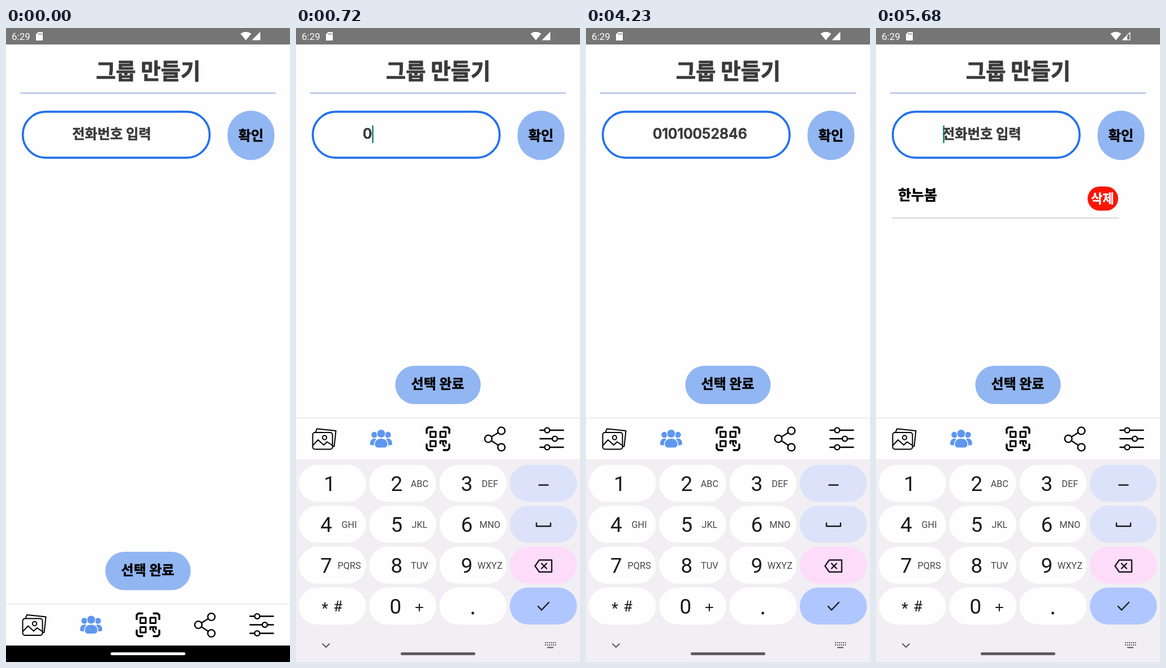
Recreate the animation shown at these times as an HTML page with a canvas. Size 502 px wide and 1116 px high, loop 5.75 s.

```html
<!DOCTYPE html>
<html lang="ko">
<head>
<meta charset="utf-8">
<style>
html, body { margin: 0; width: 502px; height: 1116px; overflow: hidden; background: #fefefe; }
canvas { display: block; }
</style>
</head>
<body>
<canvas id="stage" width="502" height="1116"></canvas>
<script>
const ctx = document.getElementById('stage').getContext('2d');
const LOOP = 5750;
const KOREAN = '"Noto Sans CJK KR", "Noto Sans CJK JP", "Noto Sans CJK", sans-serif';
const LATIN = 'Roboto, sans-serif';
const DIGITS = '01010052846';
const KEY_TIMES = [720, 920, 1250, 1450, 1650, 1850, 2250, 2650, 3050, 3310, 3770];
const PRESS = 4490, CLEAR = 4560, ADDED = 4840;
const SHIFT = 327.5;
const INK = '#1b1b1f';

function box(x, y, w, h, r, fill) {
  ctx.beginPath();
  ctx.roundRect(x, y, w, h, r);
  if (fill) { ctx.fillStyle = fill; ctx.fill(); }
}

function line(points, color, width, close) {
  ctx.beginPath();
  points.forEach(([x, y]) => ctx.lineTo(x, y));
  if (close) ctx.closePath();
  ctx.strokeStyle = color;
  ctx.lineWidth = width;
  ctx.stroke();
}

function disc(x, y, r, fill, stroke, width) {
  ctx.beginPath();
  ctx.arc(x, y, r, 0, Math.PI * 2);
  if (fill) { ctx.fillStyle = fill; ctx.fill(); }
  if (stroke) { ctx.strokeStyle = stroke; ctx.lineWidth = width; ctx.stroke(); }
}

function text(str, x, y, font, color, align = 'center', outline = 0) {
  ctx.font = font;
  ctx.fillStyle = color;
  ctx.textAlign = align;
  ctx.fillText(str, x, y);
  if (!outline) return;
  ctx.strokeStyle = color;
  ctx.lineWidth = outline;
  ctx.strokeText(str, x, y);
}

// Heavy, round-cornered Korean lettering centred vertically on cy.
function label(str, x, cy, size, color, align = 'center') {
  text(str, x, cy + size * 0.37, `bold ${size}px ${KOREAN}`, color, align, size / 45);
}

function statusBar(weakSignal) {
  ctx.fillStyle = '#757575';
  ctx.fillRect(0, 0, 502, 29);
  text('6:29', 10, 21, `17px ${LATIN}`, '#fff', 'left');
  ctx.beginPath();
  ctx.moveTo(57, 7); ctx.lineTo(64, 7); ctx.lineTo(65, 8); ctx.lineTo(65, 22);
  ctx.lineTo(53, 22); ctx.lineTo(53, 11); ctx.closePath();
  ctx.fillStyle = '#fff';
  ctx.fill();
  ctx.fillStyle = '#757575';
  [57, 59.5, 62].forEach(x => ctx.fillRect(x, 9, 1.2, 3));

  ctx.fillStyle = '#fff';
  ctx.beginPath();
  ctx.moveTo(424, 21.5);
  ctx.lineTo(414.5, 10);
  ctx.quadraticCurveTo(424, 3.5, 433.5, 10);
  ctx.fill();
  ctx.beginPath();
  ctx.moveTo(434.5, 21.5); ctx.lineTo(449.5, 21.5); ctx.lineTo(449.5, 6.5);
  ctx.fill();
  if (weakSignal) {
    ctx.fillStyle = '#757575';
    ctx.beginPath();
    ctx.moveTo(444, 14); ctx.lineTo(448.3, 9.6); ctx.lineTo(448.3, 20.3); ctx.lineTo(444, 20.3);
    ctx.fill();
  }
}

function photosIcon() {
  line([[35, 1038], [37, 1033], [70.5, 1036.5], [67.5, 1064], [65, 1064]], '#000', 2);
  box(29.5, 1039.5, 35, 29.5, 4, '#fefefe');
  ctx.strokeStyle = '#000';
  ctx.lineWidth = 2;
  ctx.stroke();
  line([[30, 1062], [39, 1052.5], [49, 1061.5], [55, 1056], [64, 1062]], '#000', 2);
  disc(50.5, 1048.5, 3.7, null, '#000', 2);
}

function groupIcon() {
  const blue = '#5f97ef';
  for (const side of [-1, 1]) {
    disc(150.5 + side * 12, 1043.5, 5.3, blue);
    ctx.save();
    ctx.translate(150.5, 0);
    ctx.scale(side, 1);
    box(9, 1050, 10.5, 12, [2, 8, 3, 2], blue);
    ctx.restore();
  }
  box(138, 1049, 25, 18, [11, 11, 6, 6], '#fefefe');
  box(139.5, 1050.5, 22, 15.5, [9, 9, 5, 5], blue);
  disc(150.5, 1041.5, 8.2, '#fefefe');
  disc(150.5, 1041.5, 7, blue);
}

function scanIcon() {
  ctx.save();
  ctx.translate(251, 1050.5);
  for (let i = 0; i < 4; i++) {
    line([[-20, -10], [-20, -17], [-17, -20], [-10, -20]], '#000', 3.4);
    ctx.rotate(Math.PI / 2);
  }
  ctx.strokeStyle = '#000';
  ctx.lineWidth = 3;
  [[-13.5, -12.5], [4, -12.5], [-13.5, 4]].forEach(([x, y]) => ctx.strokeRect(x, y, 9.5, 9.5));
  line([[4, 8], [4, 4], [14, 4], [14, 8]], '#000', 3);
  line([[9, 4], [9, 10], [12, 13]], '#000', 3);
  ctx.restore();
}

function shareIcon() {
  line([[363, 1036.5], [340, 1050.5], [363, 1065.5]], '#000', 2.4);
  [[340, 1050.5], [363, 1036.5], [363, 1065.5]].forEach(([x, y]) => disc(x, y, 6.4, '#fefefe', '#000', 2.4));
}

function slidersIcon() {
  [444, 457.5, 444].forEach((x, i) => {
    const y = 1035.5 + i * 15;
    line([[431.5, y], [472.5, y]], '#000', 2.6);
    disc(x, y, 4.4, '#fefefe', '#000', 2.4);
  });
}

function bottomPanel() {
  box(175.5, 922, 151, 67.5, 33.75, '#92b6f2');
  label('선택 완료', 250.5, 954, 24, '#000');
  ctx.fillStyle = '#dedede';
  ctx.fillRect(0, 1013.5, 502, 1);
  photosIcon();
  groupIcon();
  scanIcon();
  shareIcon();
  slidersIcon();
}

function keyboard(offset) {
  ctx.save();
  ctx.translate(0, offset);
  ctx.fillStyle = '#f1eff3';
  ctx.fillRect(0, 759, 502, 357);

  const sideColors = ['#dce2f9', '#dce2f9', '#fddcfa', '#b0c6ff'];
  const letters = ['', 'ABC', 'DEF', 'GHI', 'JKL', 'MNO', 'PQRS', 'TUV', 'WXYZ'];
  const big = `37px ${LATIN}`;
  for (let row = 0; row < 4; row++) {
    const y = 769 + row * 72;
    for (let col = 0; col < 4; col++) {
      box(5 + col * 124.3, y, 118.7, 65, 32.5, col < 3 ? '#fefefe' : sideColors[row]);
      if (row > 2 || col > 2) continue;
      const i = row * 3 + col;
      const x = i === 0 ? 59.5 : [53.5, 178, 302][col];
      text(String(i + 1), x, y + 46, big, INK);
      text(letters[i], 94 + col * 124.4, y + 38.5, `16.3px ${LATIN}`, '#46464c');
    }
  }
  text('*', 51, 1031, `27px ${LATIN}`, INK);
  text('#', 74, 1027, `26px ${LATIN}`, INK);
  text('0', 176, 1031, big, INK);
  line([[212, 1020], [224, 1020]], INK, 2);
  line([[218, 1014], [218, 1026]], INK, 2);
  disc(312.5, 1030, 2.4, INK);

  line([[429.5, 804.5], [445.5, 804.5]], INK, 2.4);
  line([[425, 871.5], [425, 877], [450, 877], [450, 871.5]], INK, 2.4);
  line([[422.5, 947], [430, 936.5], [452, 936.5], [452, 957.5], [430, 957.5]], INK, 2.4, true);
  line([[434, 942.5], [443, 951.5]], INK, 2.4);
  line([[443, 942.5], [434, 951.5]], INK, 2.4);
  line([[428, 1018], [434, 1024.5], [447, 1011]], INK, 2.4);

  line([[47, 1084], [53, 1090], [59, 1084]], '#55555a', 1.8);
  ctx.fillStyle = '#55555a';
  for (let row = 0; row < 2; row++)
    for (let col = 0; col < 6; col++) ctx.fillRect(440 + col * 3.5, 1081 + row * 4, 2, 2);
  ctx.fillRect(444, 1089.5, 11, 2);
  ctx.restore();
  box(185, 1099, 132, 5, 2.5, offset ? '#fff' : '#5e5c62');
}

function input(t) {
  box(29.6, 147.4, 330.4, 81, 40.5);
  ctx.strokeStyle = '#2271ec';
  ctx.lineWidth = 3.7;
  ctx.stroke();

  const typed = t < CLEAR ? KEY_TIMES.filter(k => k <= t).length : 0;
  const x = t >= CLEAR && t < CLEAR + 70 ? 111 : 118;
  let caret = x + 0.5, on;
  if (typed) {
    const value = DIGITS.slice(0, typed);
    text(value, x, 195, '600 25px Inter, sans-serif', '#3a3a3a', 'left', 0.7);
    caret = x + ctx.measureText(value).width;
    const last = KEY_TIMES[typed - 1];
    on = t - last < (last >= 3050 ? 260 : 200);
  } else {
    label('전화번호 입력', x - 1, 186, 24.3, '#3a3a3a', 'left');
    on = t >= CLEAR ? Math.floor((t - CLEAR) / 250) % 2 === 0 : t >= 260 && t < 520;
  }
  if (on) {
    ctx.fillStyle = '#0b7a70';
    ctx.fillRect(caret, 171.5, 2.4, 31);
  }
}

function confirmButton(t) {
  const step = Math.floor((t - CLEAR) / 70);
  ctx.save();
  if (t >= PRESS) ctx.globalAlpha = Math.min(1, 0.55 + 0.3 * step);
  box(391.5, 145.5, 83, 87, 41.5, '#92b6f2');
  label('확인', 433, 189, 24.3, '#000');
  ctx.restore();
}

function memberRow() {
  label('한누봄', 39, 294, 25, '#000', 'left');
  box(374, 279, 54, 42.5, 21.25, '#fb1606');
  label('삭제', 400.5, 299.5, 22, '#fff');
  ctx.fillStyle = '#b4b4b4';
  ctx.fillRect(28, 334, 401.5, 1);
}

function draw(t) {
  ctx.lineCap = ctx.lineJoin = 'round';
  ctx.fillStyle = '#fefefe';
  ctx.fillRect(0, 0, 502, 1116);
  statusBar(t >= PRESS);
  label('그룹 만들기', 251.5, 76, 38.3, '#3a3a3a');
  ctx.fillStyle = '#5b80cc';
  ctx.fillRect(25, 114, 452, 1);
  input(t);
  confirmButton(t);
  if (t >= ADDED) memberRow();

  const open = t >= 260;
  ctx.save();
  if (open) ctx.translate(0, -SHIFT);
  bottomPanel();
  ctx.restore();

  if (open) {
    const tick = Math.floor(t / 130) * 130;
    const progress = Math.min(1, (tick - 195) / 290);
    ctx.fillStyle = '#fafafa';
    ctx.fillRect(0, 759, 502, 357);
    keyboard(358 * (1 - progress) ** 2);
  } else {
    ctx.fillStyle = '#000';
    ctx.fillRect(0, 1087, 502, 29);
    box(185, 1099, 132, 5, 2.5, '#fff');
  }
}

const start = performance.now();
function tick() {
  draw((performance.now() - start) % LOOP);
  requestAnimationFrame(tick);
}
tick();
</script>
</body>
</html>
```
